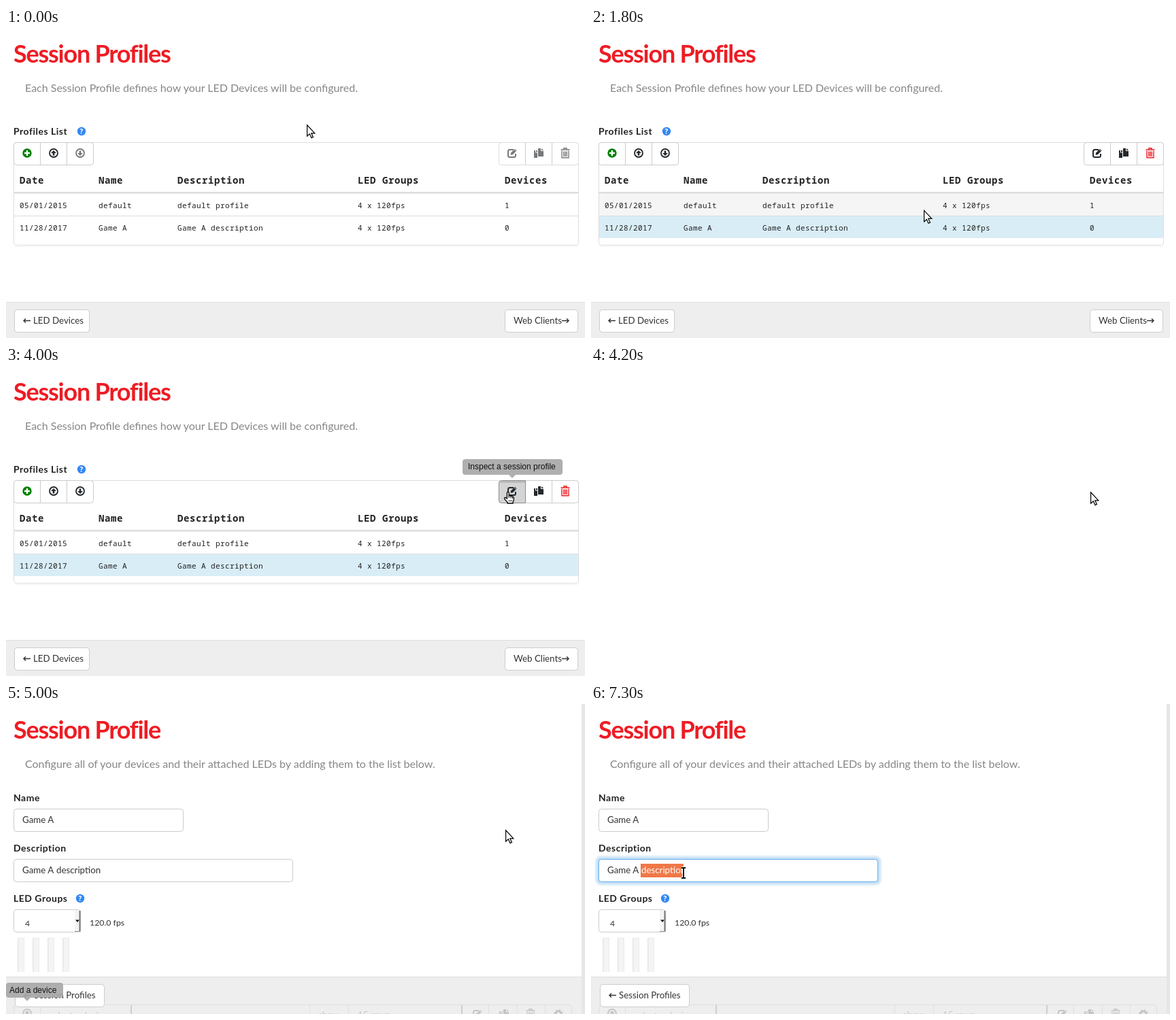
Recreate the animation shown at these times as an HTML page. Size 851 by 456 pixels, loop 8000 ms.

```html
<!DOCTYPE html>
<html lang="en">
<head>
<meta charset="utf-8">
<title>Session Profiles</title>
<style>
  html, body { margin: 0; width: 100%; height: 100%; overflow: hidden; background: #fff; }
  svg { display: block; }
  text { font: 13.3px Lato, sans-serif; fill: #333; white-space: pre; }
  .title { font-size: 36px; font-weight: 700; letter-spacing: -1.25px; fill: #ee1c24; }
  .lead { font-size: 16px; fill: #868686; }
  .label { font-size: 14px; font-weight: 700; letter-spacing: .5px; fill: #222; }
  .head { font: 700 14px "Noto Sans Mono", monospace; letter-spacing: .6px; fill: #222; }
  .cell { font: 11px "Noto Sans Mono", monospace; letter-spacing: .4px; fill: #222; }
  .tip { font: 12px "Liberation Sans", sans-serif; fill: #111; }
  .small { font-size: 12.3px; }
  .mark { font: 700 10px "Open Sans", sans-serif; fill: #fff; text-anchor: middle; }
</style>
</head>
<body>
<svg id="stage" width="851" height="456" viewBox="0 0 851 456"></svg>
<script>
const LOOP = 8000, STEP = 100;
const stage = document.getElementById('stage');
const INK = '#23282c', RED = '#ee1c24';

const clamp = v => Math.max(0, Math.min(1, v));
const text = (x, y, s, cls = '', extra = '') => `<text x="${x}" y="${y}" class="${cls}" ${extra}>${s}</text>`;
const fill = (x, y, w, h, color, extra = '') => `<rect x="${x}" y="${y}" width="${w}" height="${h}" fill="${color}" ${extra}/>`;
const box = (x, y, w, h, stroke = '#ccc', bg = '#fff', r = 4) =>
  fill(x + .5, y + .5, w - 1, h - 1, bg, `rx="${r}" stroke="${stroke}"`);
const line = (d, color = '#ccc', w = 1) => `<path d="${d}" fill="none" stroke="${color}" stroke-width="${w}"/>`;
const shape = (d, color) => `<path d="${d}" fill="${color}"/>`;
const at = (x, y, body, opacity = 1) => `<g transform="translate(${x} ${y})" opacity="${opacity}">${body}</g>`;

// Icons, centred on 0,0
const ring = line('M-6 0a6 6 0 1 0 12 0a6 6 0 1 0-12 0', INK, 1.8);
const up = 'M0-4L4 0H1.3V3.6H-1.3V0H-4Z';
const icons = {
  add: `<circle r="6.7" fill="#008000"/>` + line('M-4 0H4M0-4V4', '#fff', 2.4),
  up: ring + shape(up, INK),
  down: ring + `<g transform="scale(1 -1)">${shape(up, INK)}</g>`,
  edit: line('M2-5H-3.5Q-6-5-6-2.5V3.5Q-6 6-3.5 6H2.5Q5 6 5 3.5V1', INK, 2) +
    shape('M-2.5 2.8L-1.8-.4L4-6.2L6.6-3.6L.8 2.2Z', INK) + line('M3-5.4L6-2.4', '#fff', .8),
  copy: shape('M-7-4H-2V7H-7ZM-1-7H3V-3H7V5H-1Z', INK) + shape('M4-7L7-4H4Z', INK) +
    line('M-4.5-4V-1H-1.5', '#fff', 1),
  trash: line('M-6.5-5H6.5M-2-5.5V-7.3H2V-5.5M-5-3.5V6.8H5V-3.5M-2.2-2.5V5M0-2.5V5M2.2-2.5V5', RED, 1.4),
  trashOff: line('M-6.5-5H6.5M-2-5.5V-7.3H2V-5.5M-5-3.5V6.8H5V-3.5M-2.2-2.5V5M0-2.5V5M2.2-2.5V5', INK, 1.4),
  gear: `<circle r="4" fill="none" stroke="${INK}" stroke-width="3"/>` +
    `<circle r="5.8" fill="none" stroke="${INK}" stroke-width="2" stroke-dasharray="2.3 2.25"/>`
};
const help = (x, y) => at(x, y, `<circle r="6.2" fill="#3487f5"/>` + text(0, 3.7, '?', 'mark'));
const arrow = (x, y, dir) => at(x, y, `<g transform="scale(${dir} 1)">${line('M0 0H10M7-3L10 0L7 3', '#333', 1.4)}</g>`);

const tooltip = (x, y, w, h, tipX, textX, label, opacity) => opacity <= 0 ? '' :
  `<g opacity="${opacity}">` + fill(x, y, w, h, '#a9a9a9', 'rx="4" opacity=".92"') +
  `<path d="M${tipX - 5} ${y + h}h10l-5 5z" fill="#a9a9a9" opacity=".92"/>` +
  text(textX, y + 15, label, 'tip') + '</g>';

const cursors = {
  arrow: `<path d="M.6 .8V17.2L4.3 13.8L7 19.6L9.5 18.5L6.8 12.8H11.8Z" fill="#fff" stroke="#000" stroke-width="1.2"/>`,
  hand: `<path d="M2.4 10V1.8Q2.4 .3 3.8 .3Q5.2 .3 5.2 1.8V6Q7.7 5 8 6.7Q10.2 5.9 10.5 7.5Q12.3 7.1 12.3 9V12.5L11 15.8V17H3.2V15.5L-1.2 10.6Q-2 8.7-.2 8.3Z"
    fill="#fff" stroke="#000" stroke-width="1.3"/>` + line('M5.2 6V9M8 7V9.5M10.4 8V10', '#000') +
    line('M5.5 12V14.5M7.5 12V14.5M9.5 12V14.5', '#000', .8),
  beam: ['#fff 4', '#000 1.8'].map(s => line('M-3 1H-1L0 2L1 1H3M0 2V15M-3 16H-1L0 15L1 16H3', ...s.split(' '))).join('')
};

const moves = [
  { from: 300, steps: 8, a: [442, 142], b: [430, 287] },
  { from: 1700, steps: 9, a: [430, 287], b: [735, 187] },
  { from: 2600, steps: 1, a: [735, 187], b: [734, 185] },
  { from: 5800, steps: 9, a: [734, 185], b: [139, 242] },
  { from: 6700, steps: 1, a: [139, 242], b: [136, 240] }
];

function pointer(t) {
  let pos = moves[0].a;
  for (const { from, steps, a, b } of moves) {
    if (t < from) break;
    const p = clamp((t - from + STEP) / (steps * STEP));
    const e = .7 * p + .3 * p * p * (3 - 2 * p);
    pos = a.map((v, i) => v + (b[i] - v) * e);
  }
  return pos;
}

function listPage(t, y) {
  const selected = t >= 1500, hover = t >= 2600, pressed = t >= 4000;
  const cols = [20, 136, 252, 517, 733];
  const row = (y, values, cls) => values.map((s, i) => text(cols[i], y, s, cls)).join('');
  const over1 = y >= 243 && y < 277, over2 = y >= 277 && y < 310;
  const row2 = selected ? (over2 ? '#c4e3f3' : '#d9edf7') : over2 ? '#f5f5f5' : '#fff';
  const dim = selected ? 1 : .62;
  const edit = !hover ? '' :
    `<path d="M763.5 168.5H728.5Q724.5 168.5 724.5 172.5V197.5Q724.5 201.5 728.5 201.5H763.5Z"
      fill="${pressed ? '#d4d4d4' : '#e6e6e6'}" stroke="${pressed ? '#8c8c8c' : '#adadad'}"/>` +
    (pressed ? line('M726 170.5H763', '#bcbcbc', 3) : '');
  return text(11, 51, 'Session Profiles', 'title') +
    text(28, 94, 'Each Session Profile defines how your LED Devices will be configured.', 'lead') +
    text(11, 157, 'Profiles List', 'label') + help(111, 152) +
    line('M13 321.5H840', '#f0f0f0') + box(11, 168, 831, 152, '#ddd') +
    fill(12, 243, 829, 33, over1 ? '#f5f5f5' : '#fff') + fill(12, 277, 829, 32, row2) +
    fill(12, 241, 829, 2.5, '#ddd') + fill(12, 276, 829, 1, '#ddd') +
    box(11, 168, 118, 34) + box(724, 168, 118, 34, selected ? '#ccc' : '#ddd') +
    line('M50.5 169V201M89.5 169V201M763.5 169V201M802.5 169V201') + edit +
    at(31, 184, icons.add) + at(70, 184, icons.up) + at(109, 184, icons.down, dim) +
    at(744, 184, icons.edit, dim) + at(783, 184, icons.copy, dim) +
    at(822, 184, selected ? icons.trash : icons.trashOff, dim) +
    row(229, ['Date', 'Name', 'Description', 'LED Groups', 'Devices'], 'head') +
    row(265, ['05/01/2015', 'default', 'default profile', '4 x 120fps', '1'], 'cell') +
    row(298, ['11/28/2017', 'Game A', 'Game A description', '4 x 120fps', '0'], 'cell') +
    fill(0, 403, 851, 53, '#eee') + fill(0, 403, 851, 1, '#ddd') +
    box(12, 414, 111, 34) + arrow(36, 430.5, -1) + text(40, 435, 'LED Devices') +
    box(733, 414, 108, 34) + text(746, 435, 'Web Clients') + arrow(817, 430.5, 1) +
    tooltip(671, 137, 147, 23, 744, 679, 'Inspect a session profile', clamp((t - 2500) / 300));
}

function profilePage(t) {
  const focus = clamp((t - 7000) / 200), marked = t >= 7300;
  const glow = [6, 5, 4, 3, 2, 1].map(r =>
    `<rect x="${11 - r}" y="${228 - r}" width="${411 + 2 * r}" height="${34 + 2 * r}" rx="${4 + r}" fill="#66afe9" opacity="${.085 * focus}"/>`).join('');
  const bars = [17, 39, 61, 83].map(x => fill(x, 344, 10, 50, '#f4f4f4') +
    fill(x, 344, 1.5, 50, '#e6e6e6') + fill(x, 344, 10, 1, '#e9e9e9') + fill(x + 9, 344, 1, 50, '#ebebeb')).join('');
  const tip = Math.min(clamp((t - 4700) / 300), clamp((6900 - t) / 300));
  const toolbar = line('M11.5 456V447Q11.5 442.5 16 442.5H827Q831.5 442.5 831.5 447V456', '#dedede') +
    line('M50.5 443V456M446.5 443V456M503.5 443V456M709.5 443V456M751.5 443V456M792.5 443V456', '#e0e0e0') +
    line('M184 443V456M670 443V456', '#cfcfcf', 2) +
    at(0, 0, at(31, 455, icons.up) + at(693, 456, icons.edit) + at(732, 456, icons.copy) +
      at(771, 456, icons.trashOff) + at(812, 456, icons.gear) +
      text(459, 462, 'show') + text(517, 462, '15 rows') + text(64, 463, 'select a device'), .2);
  return text(11, 51, 'Session Profile', 'title') +
    text(28, 94, 'Configure all of your devices and their attached LEDs by adding them to the list below.', 'lead') +
    text(11, 143, 'Name', 'label') + box(11, 154, 250, 34) + text(24, 175, 'Game A') +
    text(11, 217, 'Description', 'label') + glow + box(11, 228, 411, 34) +
    (focus ? at(0, 0, box(11, 228, 411, 34, '#66afe9'), focus) : '') +
    (marked ? fill(73, 235, 63, 20, '#f07746') : '') +
    text(24, 249, 'Game A') + text(74, 249, 'description', '', marked ? 'style="fill:#fff"' : '') +
    text(11, 291, 'LED Groups', 'label') + help(109, 286) +
    box(11, 302, 99, 34) + fill(101, 303, 7, 32, '#f4f4f4') +
    line('M101 334.5H108', '#999') + line('M108.5 304V335', '#777', 2) +
    shape('M102 317.5H108L105 321Z', '#111') + text(28, 327, '4', 'small') +
    text(123, 326, '120.0 fps', 'small') + bars +
    fill(0, 402, 846, 54, '#eee') + fill(0, 401, 846, 1, '#ddd') + toolbar +
    box(13, 412, 132, 34) + arrow(37, 428.5, -1) + text(41, 433, 'Session Profiles') +
    fill(846, 0, 5, 456, '#e6e6e6') +
    tooltip(0, 410, 84, 22, 31, 5, 'Add a device', tip);
}

function scene(t) {
  const [x, y] = pointer(t);
  let page = '', cursor = 'arrow';
  if (t < 4100) page = listPage(t, y);
  else if (t >= 4700) page = profilePage(t);
  if (t < 4200 && x > 724 && y < 202) cursor = 'hand';
  if (t >= 5800 && x < 422 && y > 228) cursor = 'beam';
  return page + at(x, y, cursors[cursor]);
}

let shown = -1;
function tick(now) {
  const t = Math.floor(now % LOOP / STEP) * STEP;
  if (t !== shown) stage.innerHTML = scene(shown = t);
  requestAnimationFrame(tick);
}
tick(performance.now());
</script>
</body>
</html>
```
